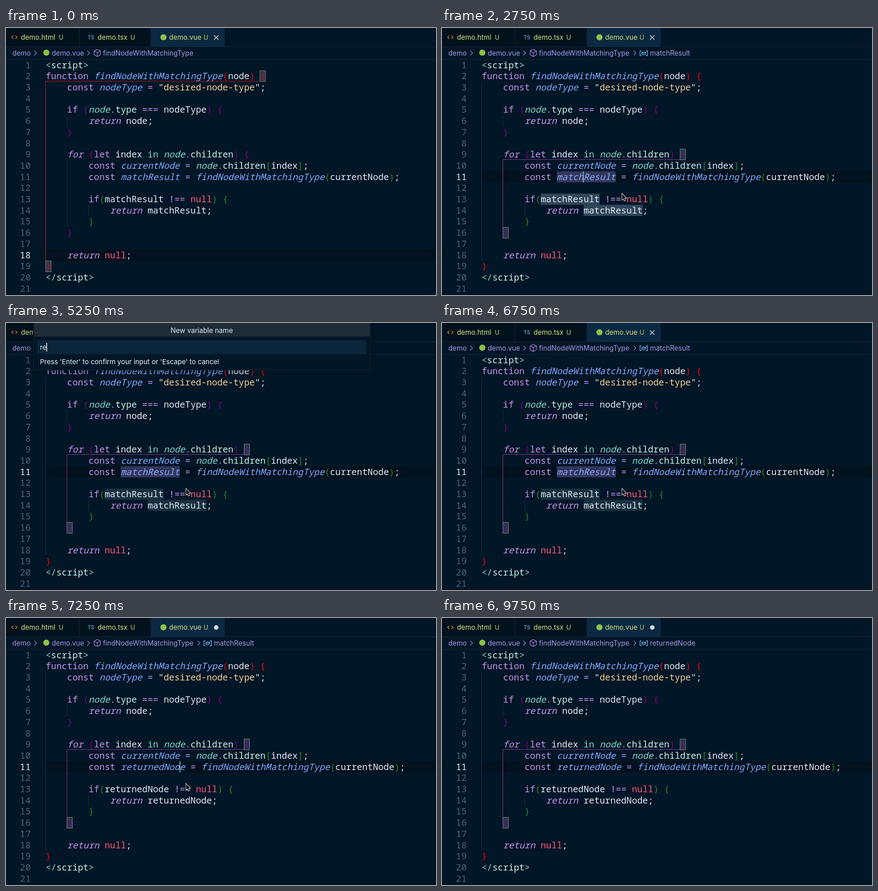
Animation of 949 by 590 pixels, one loop 10 s. Source, as an HTML page with a canvas:

```html
<!DOCTYPE html>
<html lang="en">
<head>
<meta charset="utf-8">
<title>Rename variable</title>
<style>
html, body { margin: 0; width: 100%; height: 100%; overflow: hidden; background: #011627; }
canvas { display: block; }
</style>
</head>
<body>
<canvas id="stage" width="949" height="590"></canvas>
<script>
const ctx = document.getElementById('stage').getContext('2d');
const LOOP = 10000, STEP = 250;
const X0 = 87.5, CHAR = 11.84, TOP = 69.5, ROW = 24.7;
const MONO = '19.73px "Noto Sans Mono", "DejaVu Sans Mono", monospace';
const SANS = 'Inter, "Liberation Sans", sans-serif';
const UI = '15.2px ' + SANS;
const BG = '#011627', TEXT = '#e3e9f3', LILAC = '#a599e9', LIME = '#d0e47b', GREEN = '#8dc149';

const INK = {
  k: '#c792ea', f: '#82aaff', n: TEXT, t: '#7fdbca', p: '#c6f3e8', s: '#f4d096',
  q: '#d9f5dd', r: '#f00505', m: '#800080', g: '#228b22', x: '#ff5874'
};

// First letter of a token picks the colour; a capital means italic.
const codeLines = name => [
  't<|pscript|t>',
  'kfunction |FfindNodeWithMatchingType|r(|nnode|r)|r {',
  'k    const |FnodeType|k = |q"|sdesired-node-type|q"|n;',
  '',
  'k    if |m(|Tnode|K.|ptype|k === |nnodeType|m) {',
  'K        return |nnode;',
  'm    }',
  '',
  'K    for |m(|klet |nindex |tin |Tnode|K.|pchildren|m) {',
  'k        const |FcurrentNode|k = |Tnode|K.|pchildren|g[|nindex|g]|n;',
  'k        const |F' + name + '|k = |FfindNodeWithMatchingType|g(|ncurrentNode|g)|n;',
  '',
  'k        if|g(|n' + name + '|k !== |xnull|g) {',
  'K            return |n' + name + ';',
  'g        }',
  'm    }',
  '',
  'K    return |xnull|n;',
  'r}',
  't</|pscript|t>',
  ''
];

// Step at which the pointer jumps, then its tip.
const POINTER = [
  [1, 902, 2], [2, 700, 120], [3, 440, 270], [4, 306, 336],
  [6, 376.5, 357.5], [7, 397.5, 366.5],
  [33, 447.5, 330.5], [34, 540, 220], [35, 632, 105], [36, 696, 4], [37]
];
const TYPED = ['re', 'retu', 'return', 'returned', 'returnedNo', 'returnedNode'];

const colX = c => X0 + c * CHAR;
const rowY = r => TOP + (r - 1) * ROW;

function rect(x, y, w, h, color) {
  ctx.fillStyle = color;
  ctx.fillRect(x, y, w, h);
}

function label(str, x, y, color, font = UI, align = 'left') {
  ctx.font = font;
  ctx.textAlign = align;
  ctx.fillStyle = color;
  ctx.fillText(str, x, y);
}

function line(points, color, width = 1.2, closed = false) {
  ctx.beginPath();
  points.forEach(([x, y]) => ctx.lineTo(x, y));
  if (closed) ctx.closePath();
  ctx.strokeStyle = color;
  ctx.lineWidth = width;
  ctx.stroke();
}

function dot(x, y, r, color) {
  ctx.beginPath();
  ctx.arc(x, y, r, 0, Math.PI * 2);
  ctx.fillStyle = color;
  ctx.fill();
}

function tabs(dirty) {
  rect(0, 0, 320, 41, '#01111d');
  rect(320, 0, 162, 41, '#0b2942');
  [162, 320, 482].forEach(x => rect(x - 0.5, 0, 1, 41, '#1c2a3a'));
  rect(0, 41, 949, 1, '#1b2b3b');

  line([[16, 17], [12.5, 20.5], [16, 24]], '#e37933', 1.5);
  line([[21, 17], [24.5, 20.5], [21, 24]], '#e37933', 1.5);
  label('TS', 180, 25, '#519aba', '600 11.5px ' + SANS);
  dot(347.5, 20.5, 6.8, GREEN);

  [['demo.html', 33, 116.5], ['demo.tsx', 202, 274.5], ['demo.vue', 360, 436]].forEach(([file, x, mark]) => {
    label(file, x, 26.3, LIME);
    label('U', mark, 26, '#9fb267', '500 14px ' + SANS);
  });

  if (dirty) dot(464, 21, 5, '#d2dee7');
  else {
    line([[459, 16], [469, 26]], '#d2dee7', 1.4);
    line([[469, 16], [459, 26]], '#d2dee7', 1.4);
  }
}

function chevron(x) {
  line([[x, 50.5], [x + 5, 55.5], [x, 60.5]], '#8d86c8', 1.4);
}

function crumbs(symbol) {
  rect(0, 69, 949, 1, '#162838');
  label('demo', 14, 60.8, LILAC);
  chevron(62.5);
  dot(89, 54.5, 6.8, GREEN);
  label('demo.vue', 101, 60.8, LILAC);
  chevron(179.5);

  const cube = '#b180d7';
  line([[201.5, 47.5], [208.5, 51], [208.5, 59], [201.5, 63], [194.5, 59], [194.5, 51]], cube, 1.3, true);
  line([[194.5, 51], [201.5, 54.5], [208.5, 51]], cube, 1.3);
  line([[201.5, 54.5], [201.5, 63]], cube, 1.3);
  label('findNodeWithMatchingType', 214, 60.8, LILAC);
  if (!symbol) return;

  chevron(423);
  const blue = '#75beff';
  line([[440, 50.5], [437, 50.5], [437, 61], [440, 61]], blue, 1.3);
  line([[450, 50.5], [453.5, 50.5], [453.5, 61], [450, 61]], blue, 1.3);
  line([[445, 52.5], [449.5, 54], [449.5, 57.5], [445.5, 59.5], [441, 57.8], [441, 54.3]], blue, 1.2, true);
  line([[441, 54.3], [445.5, 56], [449.5, 54]], blue, 1.2);
  label(symbol, 459, 60.8, LILAC);
}

function guide(col, from, to) {
  rect(Math.floor(colX(col)), rowY(from), 1, (to - from + 1) * ROW, '#17344f');
}

function bracketBox(row, col) {
  const x = colX(col), y = rowY(row);
  rect(x, y, CHAR, ROW, '#26394c');
  ctx.strokeStyle = '#80868c';
  ctx.lineWidth = 1;
  ctx.strokeRect(Math.round(x) - 0.5, Math.round(y) + 0.5, 12, 24);
}

function scope(col, from, to, braceCol, color) {
  const x = Math.floor(colX(col)) + 0.5, y = Math.floor(rowY(from + 1)) - 0.5;
  line([[x, rowY(to)], [x, y], [colX(braceCol), y]], color, 1);
  bracketBox(from, braceCol);
  bracketBox(to, col);
}

function marks(level) {
  if (!level) return;
  const soft = level === 1 ? '#19303f' : '#30465a';
  [[11, 14, '#33365a'], [13, 11, soft], [14, 19, soft]].forEach(([row, col, color]) =>
    rect(colX(col), rowY(row), 11 * CHAR, ROW, color));
}

function codeText(name, active) {
  codeLines(name).forEach((src, i) => {
    const y = rowY(i + 1) + 19.1;
    const on = i + 1 === active;
    label(String(i + 1), 54.5, y, on ? '#dcecf8' : '#4b6479', (on ? '500 ' : '') + MONO, 'right');
    let col = 0;
    if (src) src.split('|').forEach(tok => {
      const code = tok[0], str = tok.slice(1), key = code.toLowerCase();
      const pad = str.length - str.trimStart().length;
      label(str.trim(), colX(col + pad), y, INK[key], (code !== key ? 'italic ' : '') + '500 ' + MONO);
      col += str.length;
    });
  });
}

function editor(k, name) {
  const active = k < 6 ? 18 : 11;
  rect(X0, rowY(active), 949, ROW, 'rgba(0,0,0,.22)');
  marks(k < 7 || k > 28 ? 0 : k < 13 || k === 28 ? 2 : 1);
  guide(0, 3, 18);
  guide(4, 6, 6);
  guide(4, 10, 15);
  guide(8, 14, 14);
  if (k < 6) scope(0, 2, 19, 40, '#c81e24');
  else scope(4, 9, 16, 37, '#8f3a93');
  codeText(name, active);

  const span = (a, b) => k >= a && k < b;
  const caretOn = span(6, 9) || span(11, 13) || span(28, 31) || span(33, 35) || span(37, 39);
  if (caretOn) rect(Math.round(colX(k < 29 ? 19 : 25)) - 1, rowY(11), 2, ROW, '#80a4c2');
}

function dialog(k) {
  ctx.save();
  ctx.shadowColor = 'rgba(0,0,0,.4)';
  ctx.shadowBlur = 14;
  rect(60, -10, 745, 114, BG);
  ctx.restore();
  ctx.strokeStyle = '#152839';
  ctx.lineWidth = 1;
  ctx.strokeRect(60.5, -10, 744, 114);
  rect(62, 0, 741, 30, '#1f2b36');
  label('New variable name', 432, 21.5, TEXT, UI, 'center');
  rect(69, 38, 726, 31, '#0b253a');

  const fresh = k < 21;
  const value = fresh ? 'matchResult' : TYPED[Math.min(k - 21, TYPED.length - 1)];
  ctx.font = UI;
  const end = 75 + ctx.measureText(value).width;
  if (fresh) rect(75, 44, end - 75, 19, '#4070bd');
  label(value, 75, 59.2, '#e2eaf2');
  if (!fresh) rect(Math.round(end), 44, 1.5, 19, '#ffffff');
  label("Press 'Enter' to confirm your input or 'Escape' to cancel", 75, 91, '#eef2f8', '15px ' + SANS);
}

function pointer(k) {
  const spot = POINTER.filter(p => p[0] <= k).pop();
  if (!spot || spot.length < 3) return;
  ctx.save();
  ctx.translate(spot[1], spot[2]);
  const shape = [[0, 0], [0, 13], [2.9, 10.3], [5, 15.2], [7.2, 14.2], [5.1, 9.5], [9, 9.2]];
  line(shape, '#ffffff', 1.8, true);
  ctx.fillStyle = '#0a0a0a';
  ctx.fill();
  ctx.restore();
}

function draw(k) {
  const name = k < 29 ? 'matchResult' : 'returnedNode';
  rect(0, 0, 949, 590, BG);
  tabs(k >= 29);
  crumbs(k < 6 ? '' : k < 30 ? 'matchResult' : name);
  editor(k, name);
  if (k >= 13 && k < 27) dialog(k);
  pointer(k);
}

const start = performance.now();
function tick() {
  const t = (performance.now() - start) % LOOP;
  draw(Math.floor(t / STEP));
  requestAnimationFrame(tick);
}
tick();
</script>
</body>
</html>
```
